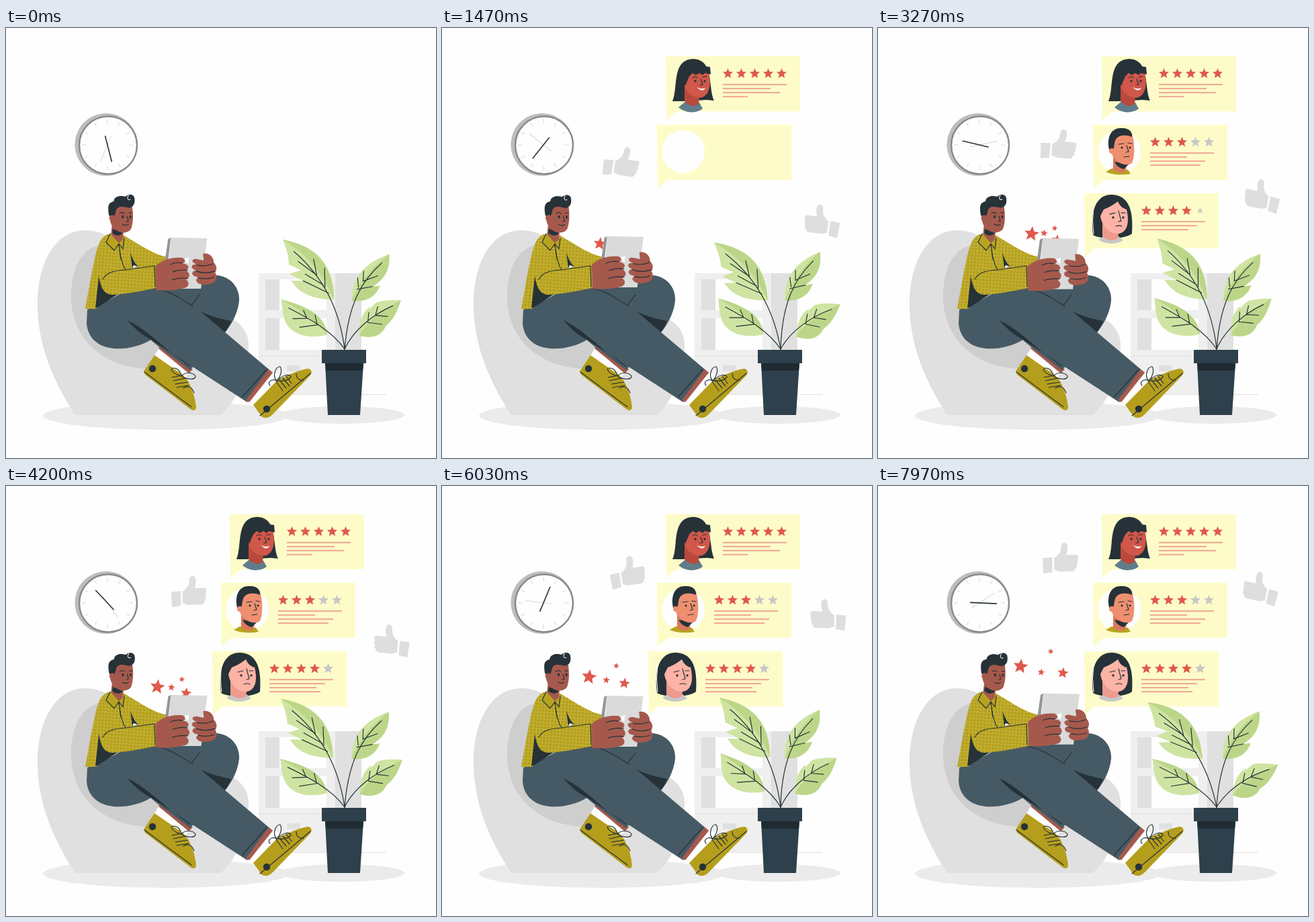
Write an HTML page that moves like this. It is 640 px wide and 640 px high and loops after 8000 ms.

```html
<!DOCTYPE html>
<html lang="en">
<head>
<meta charset="utf-8">
<title>Customer reviews</title>
<style>
html,body{margin:0;width:100%;height:100%;overflow:hidden;background:#fefefe}
svg{display:block;width:100vw;height:100vh}
.ink{fill:none;stroke:#263238;stroke-width:1.2;stroke-linecap:round;stroke-linejoin:round}
.dark{fill:#263238}
.white{fill:#fefefe}
.skin{fill:#a5594c}
.pants{fill:#455a64}
.shirt{fill:#b8a31f}
.shoe{fill:#b59e1c}
.grey{fill:#e0e0e0}
.pale{fill:#efefef}
.red{fill:#e0594b}
.thumb{fill:#dedede}
.leaf{fill:#cfe4a2}
.shade{fill:#bbd688}
</style>
</head>
<body>
<svg viewBox="0 0 640 640" xmlns="http://www.w3.org/2000/svg">
<defs>
  <pattern id="plaid" width="5" height="5" patternUnits="userSpaceOnUse" patternTransform="rotate(4)">
    <rect width="5" height="5" fill="#b5a01a"/><path d="M0 .5H5M.5 0V5" stroke="#c9b74a" stroke-width=".8"/>
  </pattern>
  <g id="thumbUp">
    <path d="M-28 0L-13-1V22L-27 24Z"/>
    <path d="M-10 0C-3-4 1-10 1-17C1-25 9-27 11-20C12-14 10-9 9-5H25C29-4 28 1 26 3C28 6 27 9 25 10C27 13 25 16 23 16C24 19 21 21 18 21H-2L-10 18Z"/>
  </g>
</defs>

<g id="floor" fill="#ebebeb">
  <ellipse cx="238" cy="577" rx="183" ry="21"/>
  <ellipse cx="500" cy="576" rx="93" ry="13"/>
</g>

<g id="shelf">
  <path class="pale" d="M376 365H490V546H376Z"/>
  <path class="white" d="M407 374H477V420H407ZM407 432H477V479H407Z"/>
  <path class="grey" d="M386 374H407V420H386ZM386 432H407V479H386ZM490 365H529V546H490ZM418 502H438V511H418Z"/>
  <path d="M376 488H490M400 545.5H566" stroke="#e0e0e0"/>
</g>

<g id="clock">
  <circle cx="149" cy="173.5" r="46.5" fill="#bdbdbd"/>
  <circle class="white" cx="152" cy="174.5" r="43" stroke="#8a8a8a" stroke-width="2.5"/>
  <g id="ticks" stroke="#dedede" stroke-width="1.2"></g>
  <path id="fastHand" d="M151 188V147" stroke="#dcdcdc" stroke-width="1.2"/>
  <path id="slowHand" d="M151 188V148" stroke="#263238" stroke-width="1.6"/>
</g>

<g id="thumbs" class="thumb">
  <use id="thumbL" href="#thumbUp"/><use id="thumbR" href="#thumbUp"/>
</g>

<g id="bubbles"></g>

<g id="beanbag">
  <path class="grey" d="M103 576C78 538 47 480 47 412C47 345 76 301 118 301C162 301 188 340 205 390L325 428C352 437 362 455 361 475C359 520 342 558 319 576Z"/>
  <path fill="#cecece" d="M150 322C115 321 97 355 97 400C97 455 135 502 207 507L300 480L200 380Z"/>
</g>

<g id="floating" class="red"></g>

<g id="man">
  <path class="pants" d="M215 392C240 378 282 367 312 368C334 369 348 386 347 406C345 426 334 444 325 454L262 420Z"/>
  <path class="dark" d="M270 412C290 424 312 432 335 436C332 444 329 449 325 454Z"/>
  <path class="ink" d="M288 397L273 417"/>

  <g id="farShoe">
    <path class="white" d="M229 474L274 512L266 520L220 489Z"/>
    <path class="skin" d="M231 469L278 508L272 514L227 477Z"/>
    <path class="shoe" d="M205 511L221 487L260 514C274 524 281 546 283 565C282 570 278 570 274 567L207 516Z"/>
    <path class="ink" d="M206 512L276 564M264 536C270 532 276 533 280 543M247 520L263 517M249 525L268 521M252 530L271 527M254 535L272 532M258 517C246 513 244 506 249 506C256 506 260 512 261 518C266 512 278 512 282 518C283 524 269 524 261 518"/>
    <circle class="dark" cx="218" cy="507" r="5.2"/>
  </g>

  <path class="pants" d="M215 464L227 474L274 509L292 490Z"/>
  <path class="ink" d="M233 472L273 503"/>
  <path class="pants" d="M121 419C152 411 176 385 207 384C238 384 266 402 292 424L397 513L359 557L216 464C180 485 124 484 120 440Z"/>
  <path class="dark" d="M181 435C201 445 222 462 245 483L216 464C203 457 190 447 181 435Z"/>
  <path class="ink" d="M210 386C238 387 257 401 278 414M388 508L352 549"/>

  <g id="nearShoe">
    <path class="white" d="M397 513L411 517L372 563L359 555Z"/>
    <path class="skin" d="M391 508L397 513L362 557L357 554Z"/>
    <path class="shoe" d="M368 561L405 523C420 517 438 508 450 507C456 509 456 514 452 518L397 575C391 581 386 581 381 579Z"/>
    <path class="ink" d="M378 577L453 514M432 514C432 522 437 525 443 524M402 526L412 540M407 524L417 536M412 521L422 533M417 518L425 529M403 525C396 518 401 504 408 504C412 510 408 520 403 525C414 514 424 515 424 520C419 525 410 526 403 525C396 521 388 527 393 532"/>
    <circle class="dark" cx="388" cy="567" r="5.2"/>
  </g>

  <path fill="url(#plaid)" d="M150 308C134 314 131 350 118 418H135L150 345Z"/>
  <path class="dark" d="M141 343L133 417C143 413 155 403 170 394L146 380Z"/>
  <path fill="url(#plaid)" d="M150 307L176 309C200 323 219 337 240 341L236 357L190 360L150 365Z"/>
  <path class="dark" d="M185 334C188 343 191 350 197 355L188 358Z"/>
  <path class="white" d="M190 353L196 355L188 358Z"/>
  <path fill="url(#plaid)" d="M150 308C133 316 133 345 138 368C141 386 145 396 158 397C180 396 203 391 224 387L223 353L176 360L166 326Z"/>
  <path class="ink" d="M169 331C171 344 174 354 178 360L221 354L222 385M144 374C149 365 158 361 178 360"/>

  <g id="head">
    <path class="skin" d="M158 290L175 300L174 318L168 326L156 309Z"/>
    <path class="dark" d="M159 299L174 305C169 311 162 309 158 305Z"/>
    <path class="skin" d="M156 268L187 263C190 279 189 291 186 299C180 307 169 305 163 300C155 295 154 284 153 274Z"/>
    <path class="dark" d="M153 279C150 263 153 260 160 258C160 252 168 248 177 251C183 246 191 247 191 255C192 264 186 269 179 267C171 265 164 265 163 274L161 280Z"/>
    <path d="M182 249C179 253 181 257 185 255" fill="none" stroke="#fefefe"/>
    <circle class="skin" cx="158" cy="283" r="4.5"/>
    <g class="dark"><ellipse cx="173.5" cy="281" rx="1.6" ry="2.3"/><ellipse cx="185" cy="281" rx="1.5" ry="2.3"/></g>
    <path class="ink" d="M169 276Q173 273 176 276M183 275L187 275M180 280L182 287L179 288M173 292Q178 295 182 292"/>
  </g>
  <path class="shirt" d="M155 306L149 319L161 330L168 322L173 329L177 312L168 320Z"/>
  <path class="ink" d="M155 306L149 319L161 331L168 321L174 329L176 313M168 322L171 344"/>

  <g id="tablet">
    <path fill="#949494" d="M241 315L245 313L240 357H235Z"/>
    <path fill="#dadada" d="M245 313L299 314L290 389H239Z"/>
    <path class="white" d="M264 345L272 342L271 352Z"/>
    <path class="skin" d="M222 356C231 346 246 342 262 343C269 346 266 352 260 352C271 350 275 359 267 362C275 365 274 374 267 375C274 379 272 387 265 388C250 392 236 392 223 391Z"/>
    <path class="ink" d="M244 353Q253 349 262 351M248 364Q260 360 270 362M247 376Q260 372 270 374"/>
    <path class="skin" d="M293 337C303 335 309 343 309 350C314 355 314 361 311 365C315 371 313 379 306 381C298 384 289 384 285 380C281 377 283 373 287 372C274 371 275 362 283 362C273 359 275 352 284 353C274 350 276 344 284 345L294 347Z"/>
    <path class="ink" d="M284 354Q296 357 308 352M283 363Q297 368 310 363M286 373Q298 376 309 372"/>
  </g>
</g>

<g id="plant">
  <g class="leafArm">
    <path class="leaf" d="M416 313C458 322 491 345 490 404C466 403 440 398 427 374L445 375L424 364L442 359L424 350C424 337 420 324 416 313Z"/>
    <path class="shade" d="M416 313C458 322 491 345 490 404C475 365 450 335 416 313Z"/>
    <path class="ink" d="M432 331C460 356 496 400 504 478M465 367L461 343M477 385L477 357M464 366L438 346M475 382L448 365M482 394L445 375"/>
  </g>
  <g class="leafArm">
    <path class="leaf" d="M571 337C544 346 515 364 515 406C536 409 551 400 557 384L546 385C563 375 572 361 571 337Z"/>
    <path class="shade" d="M571 337C573 361 563 375 546 385L557 384C551 400 536 409 515 406C525 380 546 355 571 337Z"/>
    <path class="ink" d="M560 350C530 376 510 410 504 478M532 377L533 362M525 386L524 372M532 377L554 369M523 389L546 385"/>
  </g>
  <g class="leafArm">
    <path class="leaf" d="M411 402C445 412 475 424 479 456C449 463 421 454 415 430C412 420 413 411 411 402Z"/>
    <path class="shade" d="M411 402C445 412 475 424 479 456C459 431 437 418 411 402Z"/>
    <path class="ink" d="M422 415C450 430 486 450 504 478M449 431L444 419M464 441L461 426M449 431L428 431M464 441L438 444"/>
  </g>
  <g class="leafArm">
    <path class="leaf" d="M585 402C567 402 552 404 547 408L538 418L540 413C528 422 524 436 525 457C546 462 559 455 564 441C574 433 580 420 585 402Z"/>
    <path class="shade" d="M585 402C580 420 574 433 564 441C559 455 546 462 525 457C536 435 557 418 585 402Z"/>
    <path class="ink" d="M573 411C545 424 515 450 504 478M548 426L551 413M537 437L538 422M548 426L566 427M537 437L558 439"/>
  </g>
  <path fill="#2e404b" d="M470 479H536V499H470ZM475 499H532L527 576H479Z"/>
  <path fill="#1f2b32" d="M475 499H532L531 510H476Z"/>
</g>
</svg>

<script>
const LOOP = 8000;
const $ = id => document.getElementById(id);
const clamp = x => Math.max(0, Math.min(1, x));
const wave = turns => Math.sin(2 * Math.PI * turns);
// Swings smoothly between 0 and 1, reaching 1 at `peak` seconds.
const swing = (s, period, peak) => (1 + Math.cos(2 * Math.PI * (s - peak) / period)) / 2;
// Springs from 0 past 1 and settles.
const spring = s => s <= 0 ? 0 : 1 - Math.exp(-5 * s) * Math.cos(8.7 * s);

function place(el, x, y, turn = 0, sx = 1, sy = sx) {
  el.setAttribute('transform', `translate(${x} ${y}) rotate(${turn}) scale(${sx} ${sy})`);
}
function rotate(el, angle, x, y) {
  el.setAttribute('transform', `rotate(${angle} ${x} ${y})`);
}

function starPath(r) {
  return 'M' + Array.from({length: 10}, (_, i) => {
    const a = i * Math.PI / 5, q = i % 2 ? r * .45 : r;
    return (q * Math.sin(a)).toFixed(2) + ' ' + (-q * Math.cos(a)).toFixed(2);
  }).join('L') + 'Z';
}

$('ticks').innerHTML = Array.from({length: 12}, (_, i) =>
  `<path d="M151 136V142" transform="rotate(${i * 30} 151 174)"/>`).join('');

// Portraits share the coordinates of the first bubble.
const faces = [
  `<path class="dark" d="M343 109C352 90 341 47 374 46C405 47 396 88 405 108L394 107L358 109Z"/>
   <path fill="#607d8b" d="M352 118L364 108L383 111L388 120C378 128 362 127 352 118Z"/>
   <path fill="#b9493b" d="M361 86L383 99L382 113C375 119 367 115 361 109Z"/>
   <path fill="#d0574a" d="M362 66L397 65C401 82 399 102 384 104C370 103 362 94 360 82Z"/>
   <path class="dark" d="M356 78Q362 56 375 55L399 58L400 69L391 67L388 70L383 67L378 70L373 67L368 72L362 86Z"/>
   <circle class="dark" cx="377" cy="79" r="1.7"/><circle class="dark" cx="391" cy="79" r="1.7"/>
   <path class="white" d="M379 88Q386 92 392 89Q388 97 379 88"/>
   <path class="ink" d="M373 74Q377 71 380 74M388 73L394 72M385 76L388 84L384 85"/>`,
  `<path class="shirt" d="M352 112L361 107L385 109L389 115C378 117 362 117 352 112Z"/>
   <path fill="#d9785c" d="M363 85L383 95L382 111C375 116 368 113 363 108Z"/>
   <path class="dark" d="M365 97L386 101L379 108Q369 106 365 97Z"/>
   <path fill="#ee8f70" d="M362 57L391 55C396 72 395 93 390 100C376 106 360 92 359 78Z"/>
   <path class="dark" d="M357 79C353 59 361 47 374 47C386 46 392 52 391 60C378 55 366 58 365 70L363 82Z"/>
   <circle fill="#ee8f70" cx="361" cy="81" r="4"/>
   <circle class="dark" cx="376" cy="76" r="1.6"/><circle class="dark" cx="388" cy="76" r="1.6"/>
   <path class="ink" d="M371 71L379 70M385 69L391 70M383 73L386 82L382 83M379 90L387 89"/>`,
  `<path class="dark" d="M346 104C342 75 347 44 374 44C402 45 406 72 404 102C394 111 357 111 346 104Z"/>
   <path fill="#c7c7c7" d="M354 111L365 104L384 106L391 112C381 119 363 118 354 111Z"/>
   <path fill="#ee9a8c" d="M360 85L385 96L383 109Q372 116 360 106Z"/>
   <path fill="#fdb3a6" d="M362 66Q373 62 383 54Q387 64 396 66C400 82 399 99 385 102C368 103 359 89 357 76Z"/>
   <path d="M347 62Q344 83 347 103" fill="none" stroke="#fefefe"/>
   <circle class="dark" cx="376" cy="78" r="1.7"/><circle class="dark" cx="391" cy="78" r="1.7"/>
   <path class="ink" d="M371 73L379 71M388 71L394 71M384 68L388 83L384 84M380 91Q385 89 389 91"/>`
];

const reviews = [
  {stars: 5, lines: [95, 71, 85, 37]},
  {stars: 3, lines: [95, 55, 82, 75], keepDisc: true},
  {stars: 4, lines: [95, 83, 70, 76]}
].map((review, n) => {
  const g = document.createElementNS('http://www.w3.org/2000/svg', 'g');
  const stars = Array.from({length: 5}, (_, i) =>
    `<path class="star" d="${starPath(8)}" fill="${i < review.stars ? '#e0594b' : '#c7c7c7'}"/>`).join('');
  const lines = review.lines.map((_, i) =>
    `<rect class="line" x="418" y="${83.2 + i * 6}" height="2" fill="#f0a494"/>`).join('');
  g.innerHTML = `<path d="M333 42H533V124H349L334 137Z" fill="#fdfcc9"/>
    <circle class="disc white" cx="372" cy="82" r="32"/><g class="face">${faces[n]}</g>${stars}${lines}`;
  $('bubbles').append(g);
  return {...review, g, start: .2 + 1.09 * n, x: 334 - 13 * n, y: 137 + 102 * n,
    disc: g.querySelector('.disc'), face: g.querySelector('.face'),
    starEls: g.querySelectorAll('.star'), lineEls: g.querySelectorAll('.line')};
});

function drawReview(r, now) {
  const s = now - r.start, size = spring(s), faceIn = clamp((s - .4) / .26);
  r.g.setAttribute('transform', `translate(${r.x} ${r.y}) scale(${size}) translate(-334 -137)`);
  r.face.setAttribute('opacity', faceIn);
  r.disc.setAttribute('opacity', r.keepDisc ? 1 : clamp((.85 - s) / .3));
  r.starEls.forEach((el, i) =>
    place(el, 425.5 + i * 20, 68, 0, clamp((s - .24 - i * .12) / .3)));
  r.lineEls.forEach((el, i) =>
    el.setAttribute('width', r.lines[i] * clamp((s - .36 - i * .18) / .15)));
}

// Each star drifts from behind the tablet at a steady speed per second.
const floating = [
  {r: 11.5, x: 240, y: 333, dx: -3.5, dy: -8.1},
  {r: 5.5, x: 250, y: 325, dx: -.9, dy: -6},
  {r: 4.5, x: 267, y: 334, dx: -1.25, dy: -11},
  {r: 8.5, x: 260, y: 342, dx: 1.9, dy: -8}
];
$('floating').innerHTML = floating.map(f => `<path d="${starPath(f.r)}"/>`).join('');
floating.forEach((f, i) => f.el = $('floating').children[i]);

const leafAngles = [
  s => -5.4 * swing(s, 3, 2),
  s => -4.5 * swing(s, 3.5, 2.05),
  s => 5 * swing(s, 3.6, 2.4) - 2.5,
  s => 8.5 * swing(s, 3, 2)
];
const leafEls = document.querySelectorAll('.leafArm');

function drawThumbs(s) {
  const k = s * 1000 / LOOP, sway = wave(k);
  $('thumbs').setAttribute('opacity', clamp((s - .1) / .5));
  place($('thumbL'), 271.5 - 4.5 * sway, 214 - 107 * (k - .05 * sway), 9 * sway, .95);
  place($('thumbR'), 559 + 16 * Math.sin(2.4 * k), 317 - 166 * k,
    1 + 12 * swing(s, 5.6, 2.7), -.95, .95);
}

function draw(s) {
  rotate($('slowHand'), 165.5 + 36 * s, 151, 174);
  rotate($('fastHand'), 203 + 72 * s, 151, 174);
  reviews.forEach(r => drawReview(r, s));
  leafEls.forEach((el, i) => rotate(el, leafAngles[i](s), 504, 478));
  drawThumbs(s);
  floating.forEach(f => place(f.el, f.x + f.dx * s, f.y + f.dy * s, 8, clamp(s / 1.7)));
  const breath = swing(s, 3, 2);
  place($('tablet'), breath, -4.3 * breath);
  rotate($('head'), 1.8 * breath, 165, 310);
}

const begin = performance.now();
function tick() {
  draw((performance.now() - begin) % LOOP / 1000);
  requestAnimationFrame(tick);
}
tick();
</script>
</body>
</html>
```
